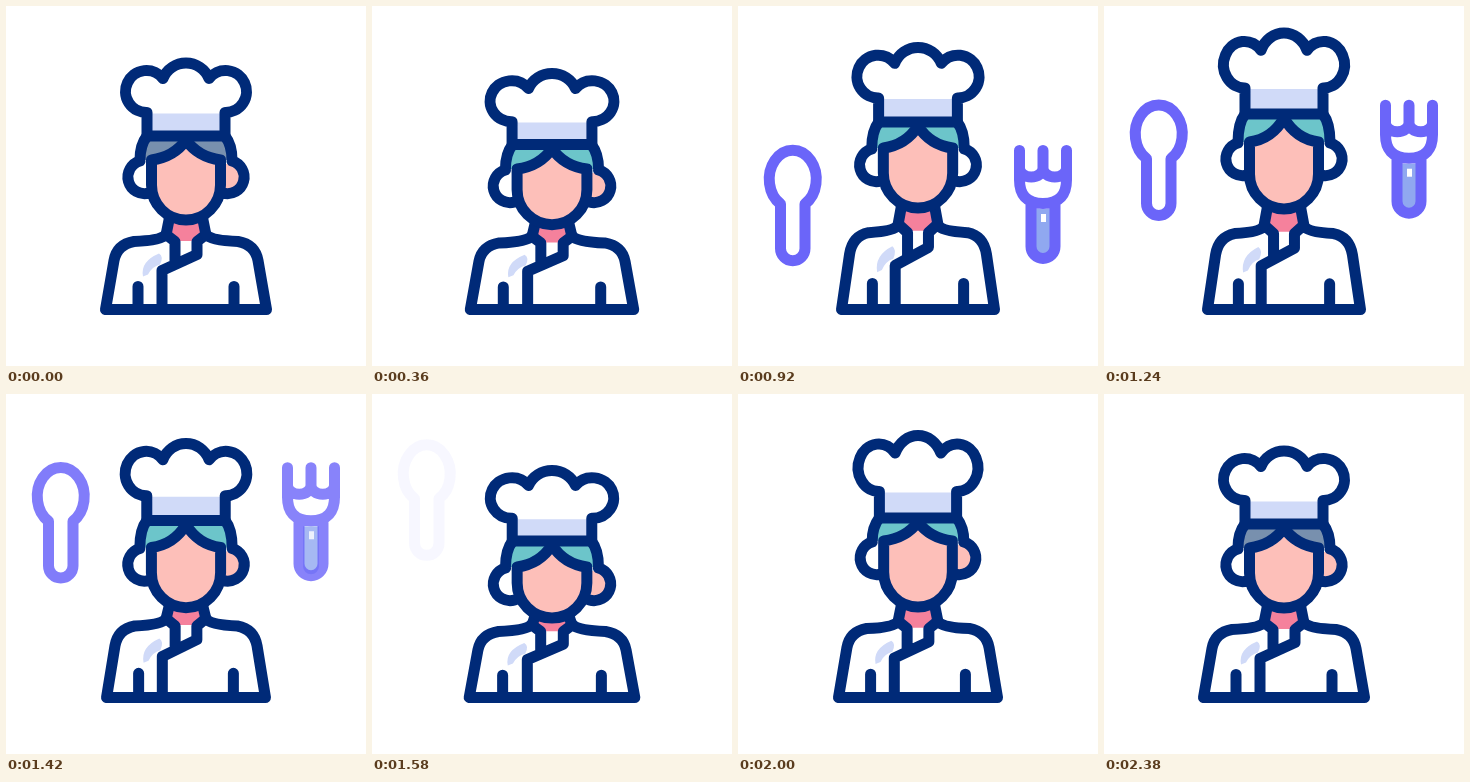
These frames come from a looping animation (360 by 360 pixels, 2620 ms). An HTML page with a canvas:

```html
<!DOCTYPE html>
<html lang="en">
<head>
<meta charset="utf-8">
<title>Chef</title>
<style>
html, body { margin: 0; height: 100%; overflow: hidden; background: #fff; }
canvas { display: block; }
</style>
</head>
<body>
<canvas id="stage" width="360" height="360"></canvas>
<script>
const ctx = document.getElementById('stage').getContext('2d');
const LOOP = 2620;
const NAVY = '#002a78', PINK = '#fdbfb9', ROSE = '#f5819c', PALE = '#d0daf8';
const VIOLET = '#6b65f9', TEAL = '#6cc5ca', SLATE = '#7890ae';

// time, hat top, brim, ear, chin, hat width, shoulder, half body width
const REST = [57, 130, 171, 214, 1, 235, 80.5];
const POSES = [
  [0, ...REST],
  [220, ...REST],
  [510, 79, 148, 190, 224, 1.05, 238, 83],
  [600, 77.5, 140.5, 185, 220.5, 1.05, 237, 82.5],
  [920, 41.5, 116, 159, 202, 1.01, 226, 76.5],
  [1260, 27, 108, 153, 203, 1, 227, 76.5],
  [1580, 76.5, 147, 190, 224, 1.02, 237, 82.8],
  [1650, 79, 148, 191, 224, 1.05, 238, 83],
  [1940, 38.5, 120, 161, 211, 0.99, 233, 79],
  [2000, 41.5, 124, 164, 213, 0.99, 234, 79.5],
  [2360, ...REST],
  [LOOP, ...REST]
];

const clamp = v => Math.max(0, Math.min(1, v));

// Smooth curve through the poses that never overshoots them
function slope(i, c) {
  if (i < 1 || i > POSES.length - 2) return 0;
  const [a, b, d] = [POSES[i - 1], POSES[i], POSES[i + 1]];
  const m = (b[c] - a[c]) / (b[0] - a[0]), n = (d[c] - b[c]) / (d[0] - b[0]);
  return m * n > 0 ? 2 * m * n / (m + n) : 0;
}

function poseAt(t) {
  const i = POSES.findIndex(p => p[0] > t) - 1;
  const a = POSES[i], b = POSES[i + 1], span = b[0] - a[0], u = (t - a[0]) / span;
  return REST.map((_, k) => {
    const c = k + 1, v = 1 - u;
    return a[c] * v * v * (1 + 2 * u) + b[c] * u * u * (3 - 2 * u)
      + span * u * v * (slope(i, c) * v - slope(i + 1, c) * u);
  });
}

// Scales the geometry about (180, from), moved to height `to`, keeping line weight
function shape(d, sx = 1, sy = 1, from = 0, to = 0) {
  const p = new Path2D();
  p.addPath(new Path2D(d), new DOMMatrix([sx, 0, 0, sy, 180 - 180 * sx, to - from * sy]));
  return p;
}

function fill(p, color) {
  ctx.fillStyle = color;
  ctx.fill(p);
}

function line(p, color = NAVY) {
  ctx.strokeStyle = color;
  ctx.lineWidth = 11;
  ctx.stroke(p);
}

function drawBody(chin, shoulder, half) {
  const k = (304 - shoulder) / 69;
  const body = d => shape(d, half / 80.5, k, 304, 303.5);
  const base = 304 - 78 * k;
  fill(new Path2D(`M163 ${chin}L160 ${base}L169 ${base + 9}H191L200 ${base}L197 ${chin}Z`), ROSE);
  fill(body('M137 271Q134 256 153 248Q158 251 154 259Q146 261 142 269Z'), PALE);
  line(body('M160 229Q155 235 128 236Q111 239 108 255L99.5 304H260.5L252 255Q249 239 232 236Q205 235 200 229'
    + 'M160 229L169 236V257M200 229L191 236V249L156 265V304M132 281V304M228 281V304'));
  line(new Path2D(`M164 ${chin - 5}L160 ${base + 3}M196 ${chin - 5}L200 ${base + 3}`));
}

function drawHead(brim, ear, chin, wide, t) {
  const head = d => shape(d, (1 + wide) / 2);
  const hair = ear - 17, jaw = chin - 35;
  const ears = `M134 ${hair + 1}A16.5 16.5 0 0 0 143 ${ear + 16}M226 ${hair + 1}A16.5 16.5 0 0 1 217 ${ear + 16}`;
  const face = `M145.5 ${hair}V${jaw}A34.5 35 0 0 0 214.5 ${jaw}V${hair}`;
  const part = `Q192 ${hair - 3} 180 ${brim + 4}Q168 ${hair - 3} 145.5 ${hair}`;
  const sides = `M141 ${brim}Q134 ${brim + 9} 134 ${hair}M219 ${brim}Q226 ${brim + 9} 226 ${hair}`;
  const moving = t >= 220 && t < 2380;

  if (t < 580 || t > 1400) {
    fill(head(`M218 ${hair + 4}H226A13 13 0 0 1 218 ${ear + 13}Z`), PINK);
  }
  fill(head(`M141 ${brim}Q134 ${brim + 9} 134 ${hair}H226Q226 ${brim + 9} 219 ${brim}Z`),
    moving ? TEAL : SLATE);
  fill(head(face + part + 'Z'), PINK);
  line(head(ears + face + part + sides));
}

function drawHat(top, brim, wide) {
  const hat = d => shape(d, wide, (brim - top) / 73, 130, brim);
  const outline = hat('M141 130V106.5A21 21 0 1 1 157 72.5A24.8 24.8 0 0 1 203 72.5A21 21 0 1 1 219 106.5V130Z');
  fill(outline, '#fff');
  fill(hat('M141 107.5H219V130H141Z'), PALE);
  line(outline);
}

function drawCutlery(t) {
  const rise = (920 - t) * 0.1415;
  const show = end => { ctx.globalAlpha = clamp((t - 620) / 140) * clamp((end - t) / 200); };
  ctx.save();
  ctx.translate(0, rise);

  show(1590);
  line(new Path2D('M42.5 198A23.5 29 0 1 1 67 198V242.5A12.2 12.2 0 0 1 42.5 242.5Z'), VIOLET);

  show(1580);
  fill(new Path2D('M297 203H313V243A8 8 0 0 1 297 243Z'), '#90a8f0');
  fill(new Path2D('M303 208H308V216H303Z'), '#fff');
  line(new Path2D('M281.5 144.5V174C281.5 188 288 197.5 305 197.5S328.5 188 328.5 174V144.5'
    + 'M281.5 162a11.75 9 0 0 0 23.5 0a11.75 9 0 0 0 23.5 0M305 144.5V165'
    + 'M293 198V240.5A12 12 0 0 0 317 240.5V198'), VIOLET);
  ctx.restore();
}

function draw(now) {
  const t = Math.floor(now % LOOP / 20) * 20;
  const [top, brim, ear, chin, wide, shoulder, half] = poseAt(t);
  ctx.clearRect(0, 0, 360, 360);
  ctx.lineCap = ctx.lineJoin = 'round';
  drawCutlery(t);
  drawBody(chin, shoulder, half);
  drawHead(brim, ear, chin, wide, t);
  drawHat(top, brim, wide);
}

let start;
function tick(now) {
  start ??= now;
  draw(now - start);
  requestAnimationFrame(tick);
}
draw(0);
requestAnimationFrame(tick);
</script>
</body>
</html>
```
